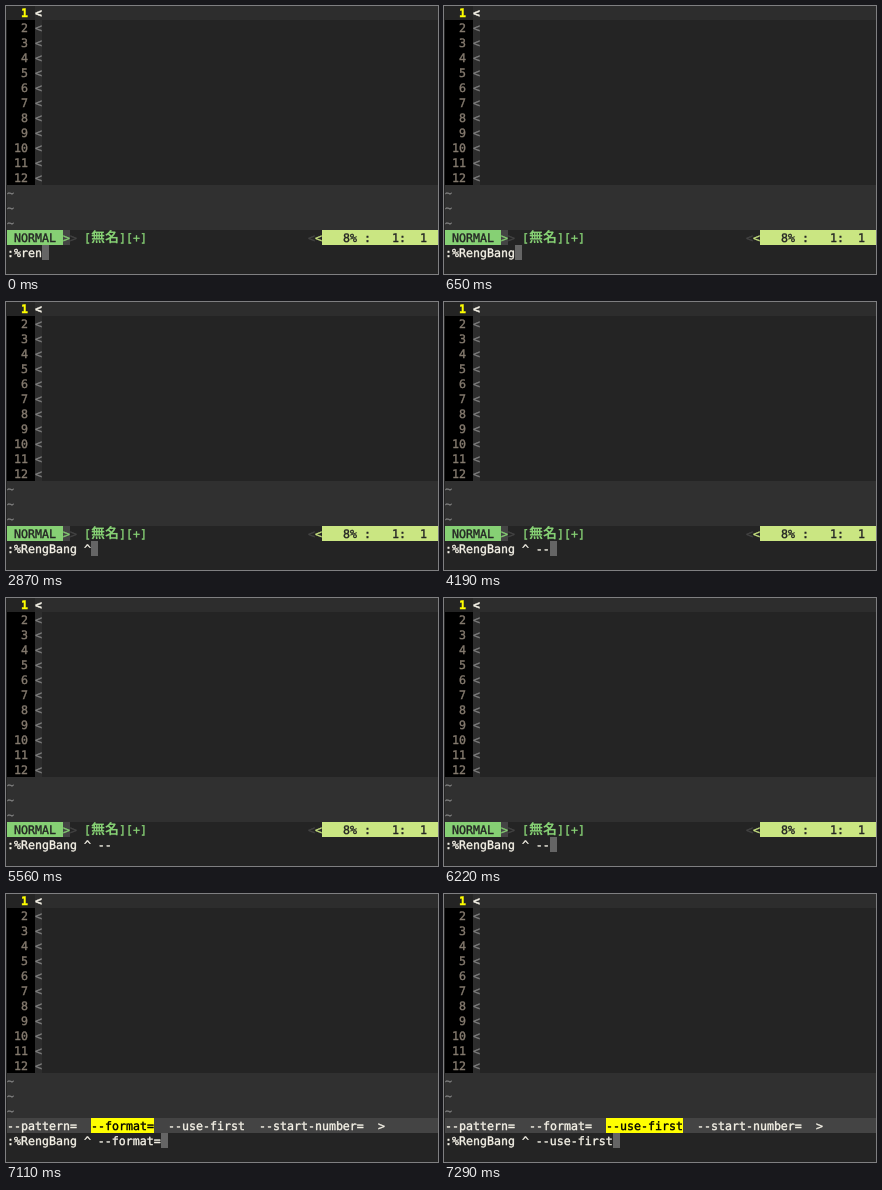
An HTML page for the animation above (8000 ms loop, 432x268 px).

```html
<!DOCTYPE html>
<html lang="ja">
<head>
<meta charset="utf-8">
<title>Command line completion</title>
<style>
html, body { margin: 0; width: 100%; height: 100%; overflow: hidden; background: #242424; }
#screen {
  position: absolute; left: 0; top: 0; width: 432px; height: 268px; overflow: hidden;
  color: #f6f3e8; background: #242424;
  font: 11.627px/15px "DejaVu Sans Mono", monospace;
  font-variant-ligatures: none; text-rendering: geometricPrecision;
}
#screen div { position: absolute; height: 15px; white-space: pre; }
#screen .group { left: 0; top: 0; height: 0; }
#screen .mono { margin-top: 1px; -webkit-text-stroke: 0.35px currentColor; }
#screen .cjk { font: bold 14px/15px "Noto Sans CJK JP", "Noto Sans CJK", sans-serif; }
</style>
</head>
<body>
<div id="screen"></div>
<script>
const CELL = 7, ROW = 15, LEFT = 1, TOP = -1, LOOP = 8000;
const STATUS = 15, COMMAND = 16;
const screen = document.getElementById('screen');

function add(parent, cls = '') {
  const el = document.createElement('div');
  el.className = cls;
  parent.append(el);
  return el;
}
const x = col => LEFT + col * CELL + 'px';

function box(parent, col, row, cols, color, rows = 1) {
  const el = add(parent);
  Object.assign(el.style, {
    left: x(col), top: TOP + row * ROW + 'px',
    width: cols * CELL + 'px', height: rows * ROW + 'px', background: color
  });
  return el;
}

function text(parent, col, row, str, color, cls = 'mono') {
  const el = add(parent, cls);
  Object.assign(el.style, { left: x(col), top: TOP + row * ROW + 'px', color });
  el.textContent = str;
  return el;
}

// Buffer
box(screen, 0, 1, 4, '#000', 11);
box(screen, 4, 0, 58, '#2d2d2d');
box(screen, 4, 1, 1, '#2d2d2d', 11);
box(screen, 0, 12, 62, '#303030', 3);
for (let i = 0; i < 12; i++) {
  const num = text(screen, 0, i, String(i + 1).padStart(3), i ? '#857b6f' : '#ff0');
  const mark = text(screen, 4, i, '<', i ? '#808080' : '#f6f3e8');
  if (!i) num.style.fontWeight = mark.style.fontWeight = 'bold';
}
for (let i = 12; i < 15; i++) text(screen, 0, i, '~', '#808080');

// Status line
const GREEN = '#86d074', LIME = '#cae682';
const status = add(screen, 'group');
box(status, 0, STATUS, 8, GREEN);
text(status, 1, STATUS, 'NORMAL', '#242424');
box(status, 8, STATUS, 1, '#444');
text(status, 8, STATUS, '>', GREEN);
text(status, 9, STATUS, '>', '#444');
text(status, 11, STATUS, '[', GREEN);
text(status, 12, STATUS, '無名', GREEN, 'cjk');
text(status, 16, STATUS, '][+]', GREEN);
text(status, 43, STATUS, '<', '#444');
text(status, 44, STATUS, '<', LIME);
box(status, 45, STATUS, 17, LIME);
text(status, 48, STATUS, '8% :   1:  1', '#242424');

// Completion menu
const menu = add(screen, 'group');
box(menu, 0, STATUS, 62, '#444');
const pick = box(menu, 0, STATUS, 1, '#ff0');
const options = [];
let col = 0;
for (const str of ['--pattern=', '--format=', '--use-first', '--start-number=', '>']) {
  options.push({ str, col, el: text(menu, col, STATUS, str) });
  col += str.length + 2;
}

// Command line
const cursor = box(screen, 0, COMMAND, 1, '#656565');
const command = text(screen, 0, COMMAND, '');

const BASE = ':%RengBang';
const ARGS = BASE + ' ^ ';
// [time, typed text, cursor visible, selected option]
const steps = [
  [0, ':%ren', 1],
  [120, ':%reng', 1],
  [420, ':%rengba', 1],
  [650, BASE, 1],
  [1310, BASE, 0],
  [1610, BASE + ' ', 1],
  [2330, BASE + ' ', 0],
  [2570, BASE + ' ', 1],
  [2870, BASE + ' ^', 1],
  [3530, ARGS, 1],
  [4070, ARGS + '-', 1],
  [4190, ARGS + '--', 1],
  [4910, ARGS + '--', 0],
  [5140, ARGS + '--', 1],
  [5560, ARGS + '--', 0],
  [5620, ARGS + '--', 1],
  [5680, ARGS + '-- ', 1],
  [6220, ARGS + '--', 1],
  [6450, ARGS + options[0].str, 1, 0],
  [7110, ARGS + options[1].str, 1, 1],
  [7290, ARGS + options[2].str, 1, 2]
];

function show([, typed, visible, choice]) {
  command.textContent = typed;
  cursor.style.left = x(typed.length);
  cursor.style.visibility = visible ? 'visible' : 'hidden';
  const open = choice !== undefined;
  menu.style.display = open ? '' : 'none';
  status.style.display = open ? 'none' : '';
  if (!open) return;
  const option = options[choice];
  pick.style.left = x(option.col);
  pick.style.width = option.str.length * CELL + 'px';
  options.forEach((o, i) => { o.el.style.color = i === choice ? '#000' : '#f6f3e8'; });
}

const start = performance.now();
let current;
function tick() {
  const t = (performance.now() - start) % LOOP;
  const step = steps.findLast(s => s[0] <= t);
  if (step !== current) show(current = step);
  requestAnimationFrame(tick);
}
tick();
</script>
</body>
</html>
```
